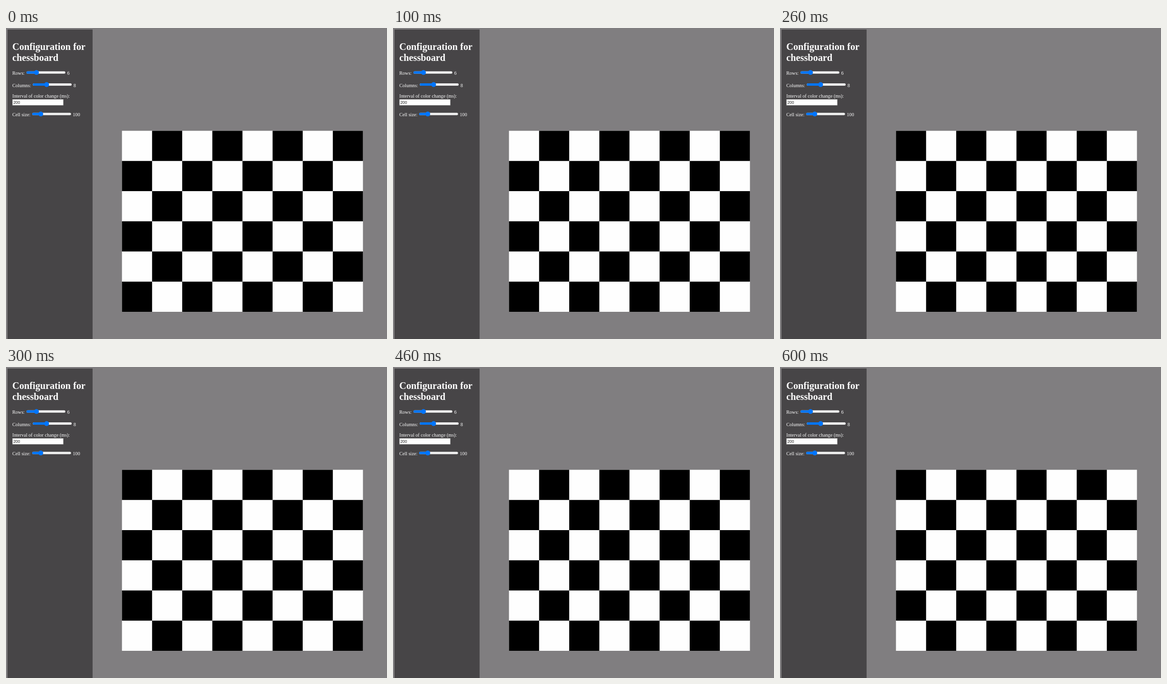
These frames come from a looping animation (800x652 px, 0.7 s). An HTML page:

```html
<!DOCTYPE html>
<html lang="en">
<head>
<meta charset="utf-8">
<title>Chessboard</title>
<style>
  html, body { margin: 0; height: 100%; overflow: hidden; background: #807e80; }
  svg { display: block; }
  text { font: 10.12px "Liberation Serif", "Times New Roman", serif; fill: #fefefe; }
  .title { font-size: 20.24px; font-weight: bold; }
  .field { font: 8.43px "Liberation Sans", Arial, sans-serif; fill: #222; }
</style>
</head>
<body>
<svg id="stage" width="800" height="652" viewBox="0 0 800 652">
  <rect x="3.2" y="3.2" width="178.6" height="649" fill="#474547"/>
  <text class="title" x="13.3" y="46">Configuration for</text>
  <text class="title" x="13.3" y="69.2">chessboard</text>
  <text x="13.3" y="146.3">Interval of color change (ms):</text>
  <rect x="13.5" y="149.5" width="107" height="12.6" fill="#fefefe" stroke="#767676" stroke-width=".6"/>
  <text class="field" x="15.4" y="158.8">200</text>
</svg>
<script>
const stage = document.getElementById("stage");
const ROWS = 6, COLUMNS = 8, CELL = 63.25, LEFT = 243.5, TOP = 215.5;
const INTERVAL = 200, LOOP = 700;

function add(tag, attrs, text = "") {
  const el = document.createElementNS("http://www.w3.org/2000/svg", tag);
  for (const key in attrs) el.setAttribute(key, attrs[key]);
  el.textContent = text;
  return stage.appendChild(el);
}

function slider(label, value, x, y, thumb) {
  const track = { x, y: y - 2.5, height: 5, rx: 2.5 };
  add("text", { x: 13.3, y: y + 5 }, label);
  add("rect", { ...track, width: 81.6, fill: "#efefef" });
  add("rect", { ...track, width: thumb - x, fill: "#0075ff" });
  add("circle", { cx: thumb, cy: y, r: 5.06, fill: "#0075ff" });
  add("text", { x: x + 85.4, y: y + 5 }, value);
}

slider("Rows:", 6, 43, 93.3, 64);
slider("Columns:", 8, 56.3, 118.6, 85.3);
slider("Cell size:", 100, 54.9, 180.3, 73);

// Path of every cell whose row + column has the given parity
function cells(parity) {
  let path = "";
  for (let row = 0; row < ROWS; row++)
    for (let col = (row + parity) % 2; col < COLUMNS; col += 2)
      path += `M${LEFT + col * CELL} ${TOP + row * CELL}h${CELL}v${CELL}h${-CELL}z`;
  return path;
}

add("rect", { x: LEFT, y: TOP, width: COLUMNS * CELL, height: ROWS * CELL, fill: "#fefefe" });
const black = add("path", {});
const patterns = [cells(1), cells(0)];

function draw() {
  const step = Math.floor(performance.now() % LOOP / INTERVAL);
  black.setAttribute("d", patterns[step % 2]);
  requestAnimationFrame(draw);
}
draw();
</script>
</body>
</html>
```
